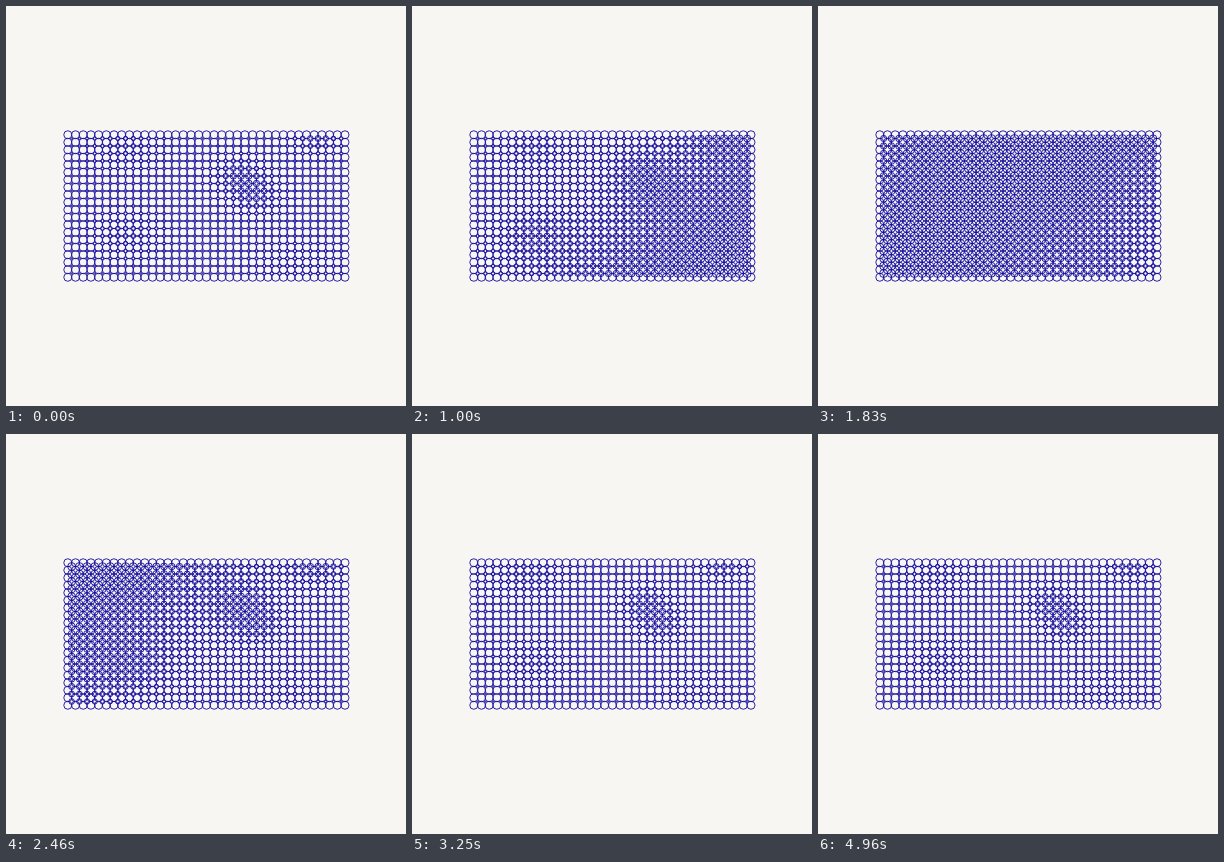
Animation of 400 by 400 pixels, one loop 5000 ms. Source, as an HTML page with a canvas:

```html
<!DOCTYPE html>
<html lang="en">
<head>
<meta charset="utf-8">
<title>Circle lattice</title>
<style>
html, body { margin: 0; width: 100%; height: 100%; overflow: hidden; background: #f7f6f2; }
canvas { display: block; width: 400px; height: 400px; }
</style>
</head>
<body>
<canvas id="stage"></canvas>
<script>
const LOOP = 5000;
const COLS = 37, ROWS = 20;
const DX = 7.7, DY = 7.5;
const LEFT = 200.4 - DX * (COLS - 1) / 2;
const TOP = 200 - DY * (ROWS - 1) / 2;
const CELL_R = 4, MIN_R = 0.6, MAX_R = 4;
const RISE = 1400;      // ms from rest to the crest of the wave
const MS_PER_PX = 3.24; // delay along the diagonal

const canvas = document.getElementById('stage');
const ctx = canvas.getContext('2d');
const ratio = window.devicePixelRatio || 1;
canvas.width = canvas.height = 400 * ratio;
ctx.scale(ratio, ratio);

const swell = (cx, cy, height, size) => (x, y) =>
  height * Math.exp(-(((x - cx) / size) ** 2 + ((y - cy) / (size * 0.7)) ** 2) / 2);

const swells = [
  swell(232, 167, 2.2, 21),
  swell(250, 191, 2.2, 21),
  swell(120, 142, 1.8, 28),
  swell(121, 228, 1.9, 27),
  swell(311, 130, 2.4, 21),
  swell(282, 258, 1.3, 30)
];

function restRadius(x, y) {
  return Math.min(MAX_R, swells.reduce((r, f) => r + f(x, y), MIN_R));
}

// Diagonal wave running from bottom right to top left
function wave(t, peak) {
  const d = ((t - peak + LOOP * 1.5) % LOOP) - LOOP / 2;
  return Math.abs(d) < RISE ? (1 + Math.cos(Math.PI * d / RISE)) / 2 : 0;
}

function grid(cols, rows, left, top, visit) {
  for (let j = 0; j < rows; j++)
    for (let i = 0; i < cols; i++) visit(left + i * DX, top + j * DY);
}

function ring(path, x, y, r) {
  path.moveTo(x + r, y);
  path.arc(x, y, r, 0, Math.PI * 2);
}

const cells = new Path2D();
grid(COLS, ROWS, LEFT, TOP, (x, y) => ring(cells, x, y, CELL_R));

const knots = [];
grid(COLS - 1, ROWS - 1, LEFT + DX / 2, TOP + DY / 2, (x, y) => {
  knots.push({ x, y, rest: restRadius(x, y), peak: 1600 + (425 - x - y) * MS_PER_PX });
});

function draw(t) {
  ctx.fillStyle = '#f7f6f2';
  ctx.fillRect(0, 0, 400, 400);
  ctx.strokeStyle = '#150c9c';
  ctx.lineWidth = 0.9;
  ctx.stroke(cells);
  ctx.beginPath();
  for (const k of knots) {
    ring(ctx, k.x, k.y, k.rest + (MAX_R - k.rest) * wave(t, k.peak));
  }
  ctx.stroke();
}

const start = performance.now();
function tick() {
  draw((performance.now() - start) % LOOP);
  requestAnimationFrame(tick);
}
tick();
</script>
</body>
</html>
```
